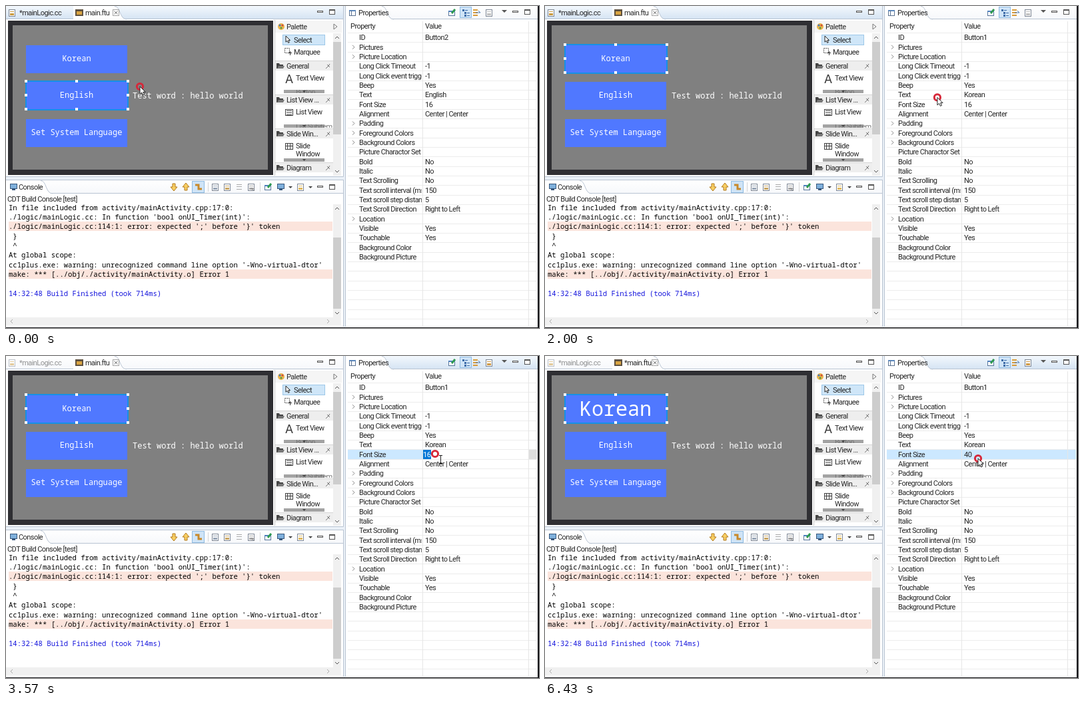
Write an HTML page with a canvas that moves like this. It is 800 px wide and 484 px high and loops after 6570 ms.

```html
<!DOCTYPE html>
<html lang="en">
<head>
<meta charset="utf-8">
<title>Changing a button's font size</title>
<style>
  html, body { margin: 0; width: 100%; height: 100%; overflow: hidden; background: #fff; }
  canvas { display: block; width: 800px; height: 484px; }
</style>
</head>
<body>
<canvas id="stage" width="800" height="484"></canvas>
<script>
const ctx = document.getElementById('stage').getContext('2d');
const LOOP = 6570, STEP = 1000 / 7;
const UI = '11px Roboto, sans-serif';
const mono = size => `${size}px "Noto Sans Mono", monospace`;
const INK = '#262626', EDGE = '#b9c4d2', ROW = 14.33;

// Moments of the interaction, in ms
const PICK = 710, ROW_CLICK = 2290, EDIT = 2430, TYPE_4 = 4140, TYPE_40 = 4430, COMMIT = 5000;

// Pointer path: time, x, y
const PATH = [
  [0, 201, 121], [140, 198, 119], [710, 132, 89], [1140, 132, 89], [1570, 395, 108],
  [2140, 652, 147], [2290, 652, 147], [2430, 644, 147], [COMMIT, 644, 147], [5430, 650, 154], [LOOP, 650, 154]
];

const PROPERTIES = [
  ['ID', ''], ['>Pictures'], ['>Picture Location'], ['Long Click Timeout', '-1'],
  ['Long Click event trigger', '-1'], ['Beep', 'Yes'], ['Text', ''], ['Font Size', ''],
  ['Alignment', 'Center | Center'], ['>Padding'], ['>Foreground Colors'], ['>Background Colors'],
  ['Picture Charactor Set'], ['Bold', 'No'], ['Italic', 'No'], ['Text Scrolling', 'No'],
  ['Text scroll interval (ms)', '150'], ['Text scroll step distance', '5'],
  ['Text Scroll Direction', 'Right to Left'], ['>Location'], ['Visible', 'Yes'],
  ['Touchable', 'Yes'], ['Background Color'], ['Background Picture']
];
const FONT_ROW = 7;

const LOG = [
  'In file included from activity/mainActivity.cpp:17:0:',
  "./logic/mainLogic.cc: In function 'bool onUI_Timer(int)':",
  "./logic/mainLogic.cc:114:1: error: expected ';' before '}' token",
  ' }', ' ^', 'At global scope:',
  "cc1plus.exe: warning: unrecognized command line option '-Wno-virtual-dtor'",
  'make: *** [../obj/./activity/mainActivity.o] Error 1', '',
  '14:32:48 Build Finished (took 714ms)'
];

function box(x, y, w, h, fill, stroke) {
  if (fill) { ctx.fillStyle = fill; ctx.fillRect(x, y, w, h); }
  if (stroke) { ctx.strokeStyle = stroke; ctx.lineWidth = 1; ctx.strokeRect(x + .5, y + .5, w - 1, h - 1); }
}

function line(points, color = '#555', width = 1) {
  ctx.beginPath();
  points.forEach(([x, y]) => ctx.lineTo(x, y));
  ctx.strokeStyle = color;
  ctx.lineWidth = width;
  ctx.stroke();
}

function shape(points, fill) {
  ctx.beginPath();
  points.forEach(([x, y]) => ctx.lineTo(x, y));
  ctx.closePath();
  ctx.fillStyle = fill;
  ctx.fill();
}

function disc(x, y, r, fill) {
  ctx.beginPath();
  ctx.arc(x, y, r, 0, 7);
  ctx.fillStyle = fill;
  ctx.fill();
}

// y is the vertical middle of the text line; baselines sit on whole pixels
function label(text, x, y, color = INK, font = UI, align = 'left') {
  ctx.font = font;
  ctx.letterSpacing = font === UI ? '-0.55px' : '0px';
  ctx.textAlign = align;
  ctx.fillStyle = color;
  ctx.fillText(text, x, Math.round(y + parseFloat(font) * .35));
}

function clipped(x, y, w, h, draw) {
  ctx.save();
  ctx.beginPath();
  ctx.rect(x, y, w, h);
  ctx.clip();
  draw();
  ctx.restore();
}

function chevron(x, y, dx, dy, color = '#555') {
  line([[x - dx - dy * 3, y - dy - dx * 3], [x + dx * 2, y + dy * 2], [x - dx + dy * 3, y - dy + dx * 3]], color);
}

function strip(x, y, w, active) {
  const shade = ctx.createLinearGradient(0, y, 0, y + 19);
  shade.addColorStop(0, active ? '#f3f8fd' : '#fff');
  shade.addColorStop(1, active ? '#d6e4f3' : '#f6f8fb');
  box(x, y, w, 20, shade);
  line([[x, y + 19.5], [x + w, y + 19.5]], EDGE);
}

function tab(x, y, w, h = 20) {
  const curve = () => {
    ctx.lineTo(x + w - 14, y + .5);
    ctx.bezierCurveTo(x + w - 5, y, x + w - 7, y + h, x + w + 4, y + h);
  };
  ctx.beginPath();
  ctx.moveTo(x, y + h);
  ctx.lineTo(x, y);
  curve();
  ctx.fillStyle = '#fff';
  ctx.fill();
  ctx.beginPath();
  curve();
  ctx.strokeStyle = EDGE;
  ctx.lineWidth = 1;
  ctx.stroke();
}

function windowButtons(x, y) {
  box(x - 4, y - 2, 9, 3, '#fff', '#555');
  box(x + 14, y - 4, 9, 8, '#fff', '#555');
  line([[x + 14, y - 2.5], [x + 23, y - 2.5]]);
}

function page(x, y, accent) {
  box(x - 5, y - 5, 10, 11, '#fff', '#7e8795');
  box(x - 3, y - 2, 6, 1, accent);
  box(x - 3, y + 1, 6, 3, accent);
}

function monitor(x, y) {
  box(x - 5, y - 5, 11, 8, '#7fb0dc', '#38577c');
  box(x - 2, y + 3, 5, 2, '#38577c');
}

function pinned(x, y) {
  box(x - 5, y - 3, 10, 8, '#fff', '#56749a');
  box(x - 5, y - 3, 10, 2, '#4f80bd');
  line([[x, y + 1], [x + 5, y - 5]], '#2f9a50', 3);
}

function blockArrow(x, y, dir) {
  const points = [[-2, -5], [2, -5], [2, 0], [5, 0], [0, 6], [-5, 0], [-2, 0]]
    .map(([px, py]) => [x + px, y + py * dir]);
  shape(points, '#f8cf63');
  line([...points, points[0]], '#b3791a');
}

function folder(x, y) {
  shape([[x, y - 4], [x + 4, y - 4], [x + 5, y - 2], [x + 10, y - 2], [x + 10, y + 4], [x, y + 4]], '#444');
  shape([[x + 3, y], [x + 12, y], [x + 10, y + 4], [x + 1, y + 4]], '#777');
}

function cross(x, y, r, color) {
  line([[x - r, y - r], [x + r, y + r]], color);
  line([[x + r, y - r], [x - r, y + r]], color);
}

function scrollbar(x, top, bottom, thumbTop, thumbBottom) {
  box(x, top, 12, bottom - top, '#f0f0f0');
  box(x, thumbTop, 12, thumbBottom - thumbTop, '#cdcdcd');
  chevron(x + 6, top + 7, 0, -1);
  chevron(x + 6, bottom - 7, 0, 1);
}

function drawEditorTabs(active, dirty) {
  strip(0, 0, 507, active);
  ctx.globalAlpha = active ? 1 : .5;
  page(9, 10, '#c99a3f');
  label('*mainLogic.cc', 20, 10);
  ctx.globalAlpha = 1;
  tab(101, 0, 76);
  box(104, 5, 12, 10, '#5e5140');
  box(106, 8, 8, 5, '#d9a441');
  label(dirty ? '*main.ftu' : 'main.ftu', 119, 10);
  box(160, 5, 10, 10, null, '#a5a5a5');
  cross(165, 10, 2.5, '#777');
  windowButtons(471, 9);
}

function drawDesigner(selected, big) {
  box(3, 22, 398, 232, '#2f2f33');
  box(10, 29, 383, 217, '#808080');
  ['Korean', 'English', 'Set System Language'].forEach((name, i) => {
    const y = Math.round(59 + i * 55.4);
    box(30, y, 152, 42, '#5078ff');
    label(name, 106, y + 20, '#fff', mono(big && i === 0 ? 30 : 12), 'center');
  });
  label('Test word : hello world', 190, 135, '#fff', mono(12));
  const top = 58 + selected * 55;
  ctx.strokeStyle = '#1590e6';
  ctx.lineWidth = 2;
  ctx.strokeRect(30, top, 153, 43);
  for (const dx of [0, 76, 153]) for (const dy of [0, 21, 42])
    if (dx !== 76 || dy !== 21) box(28 + dx, top - 2 + dy, 4, 4, '#fff');
}

function drawPalette() {
  box(404, 22, 100, 233, '#fff');
  line([[403.5, 21], [403.5, 255]], '#c8c8c8');
  box(404, 22, 100, 18, '#f5f5f5');
  disc(413, 31, 5, '#e9b44c');
  disc(411, 29, 1.5, '#3f78c8');
  disc(415, 29, 1.5, '#cf4a3a');
  disc(413, 33, 1.5, '#4b9a4b');
  label('Palette', 421, 31);
  line([[492, 27], [497, 31], [492, 35], [492, 27]], '#777');
  box(415, 43, 64, 16, '#cfe6f8', '#9cc7e8');
  arrow(420, 45, .8);
  label('Select', 432, 51);
  ctx.setLineDash([2, 1]);
  box(418, 63, 8, 8, null, '#555');
  ctx.setLineDash([]);
  line([[424, 70.5], [429, 70.5]], '#333');
  line([[426.5, 68], [426.5, 74]], '#333');
  label('Marquee', 432, 69);

  [['General', 90], ['List View ...', 141], ['Slide Win...', 192], ['Diagram', 243]].forEach(([name, y]) => {
    box(404, y - 8, 87, 15, '#eeeeee');
    line([[404, y - 7.5], [491, y - 7.5]], '#d5d5d5');
    folder(406, y);
    label(name, 421, y);
    line([[480, y + 4], [484, y], [482, y - 2], [486, y + 2], [484, y], [486, y - 3]], '#777');
  });

  label('A', 425, 110, '#333', '17px "DejaVu Sans", sans-serif', 'center');
  label('Text View', 435, 108);
  label('List View', 435, 159);
  label('Slide', 435, 210);
  label('Window', 435, 222);
  box(419, 155, 12, 10, '#fff', '#444');
  for (const y of [157, 160, 163]) box(421, y, 8, 1, '#444');
  box(419, 206, 12, 10, '#fff', '#444');
  for (const x of [422, 426]) box(x, 207, 1, 8, '#444');
  box(420, 210, 10, 1, '#444');
  [[126, 'Button'], [178, 'List Subitem'], [229, '']].forEach(([y, hidden]) => {
    box(417, y, 61, 5, '#a3a3a3');
    clipped(417, y, 74, 5, () => label(hidden, 435, y + 3, '#777'));
    shape([[445, y + 1], [450, y + 1], [447.5, y + 4]], '#444');
  });
  scrollbar(491, 41, 255, 54, 193);
}

function drawConsole() {
  box(0, 261, 507, 222, '#fff');
  strip(0, 262, 507, false);
  tab(0, 262, 66);
  line([[0, 261.5], [507, 261.5]], EDGE);
  monitor(11, 272);
  label('Console', 19, 272);
  blockArrow(252, 272, 1);
  blockArrow(270, 272, -1);
  box(279, 263, 19, 18, '#cfe4f7', '#8fbbe2');
  line([[284, 269], [289, 269], [289, 275], [294, 275]], '#c8892b', 3);
  page(314, 272, '#9aa7b8');
  page(332, 272, '#c9a765');
  for (const y of [268, 271, 275]) box(346, y, 8, 1, '#aaa');
  page(368, 272, '#aaa');
  cross(370.5, 275.5, 2.5, '#888');
  line([[303.5, 265], [303.5, 279]], '#d5d5d5');
  line([[381.5, 265], [381.5, 279]], '#d5d5d5');
  pinned(393, 272);
  monitor(412, 272);
  page(442, 272, '#e0ba62');
  for (const x of [427, 457]) shape([[x - 3, 271], [x + 3, 271], [x, 274]], '#444');
  windowButtons(471, 272);
  label('CDT Build Console [test]', 2, 290);

  LOG.forEach((text, i) => {
    const y = 303 + i * ROW;
    if (i === 2 || i === 7) box(4, Math.round(y - 7.5), 486, 14, '#fbe4dc');
    label(text, 4, y, i === 9 ? '#1414dc' : '#000', mono(10.625));
  });
  scrollbar(491, 298, 468, 348, 455);
  box(0, 468, 503, 12, '#f0f0f0');
  chevron(9, 474, -1, 0, '#aaa');
  chevron(483, 474, 1, 0, '#aaa');
}

function drawProperties(state) {
  const { active, editing, hovered, committed, typed, selected } = state;
  box(509, 0, 289, 483, '#fff');
  strip(510, 0, 288, active);
  tab(510, 0, 68);
  box(515, 6, 10, 9, '#fff', '#5c7392');
  box(515, 6, 10, 2, '#5b88bd');
  line([[518.5, 7], [518.5, 15]], '#5c7392');
  label('Properties', 529, 10);
  pinned(669, 10);
  box(681, 1, 18, 17, '#cfe4f7', '#8fbbe2');
  for (const [x, y] of [[685, 5], [688, 9], [688, 13]]) {
    box(x, y, 3, 3, '#3e6ca8');
    box(x + 4, y + 1, 4, 1, '#3e6ca8');
  }
  for (const y of [5, 9, 13]) box(701, y, 7, 2, '#d99b3a');
  line([[705, 10], [712, 10], [709, 7]], '#4b78b0');
  page(725, 10, active ? '#cf9a45' : '#c0c0c0');
  shape([[744, 6], [752, 6], [748, 10]], '#555');
  windowButtons(764, 9);

  label('Property', 517, 30.5);
  label('Value', 629, 30.5);
  const rowTop = Math.round(47.5 + (FONT_ROW - .5) * ROW);
  if (editing) {
    box(513, rowTop, 112, 14, '#cce8ff');
  } else if (hovered || committed) {
    box(513, rowTop, 284, 14, committed ? '#cce8ff' : '#e5f3ff');
  }
  for (let i = 0; i <= 30; i++) {
    const y = Math.round(40 + i * ROW) + .5;
    line([[513, y], [796, y]], '#ececec');
  }
  for (const x of [625.5, 784.5]) line([[x, 23], [x, 481]], '#e6e6e6');

  const values = { 0: selected ? 'Button2' : 'Button1', 6: selected ? 'English' : 'Korean' };
  PROPERTIES.forEach(([entry, fixed = ''], i) => {
    const y = 47.5 + i * ROW, expandable = entry[0] === '>';
    if (expandable) chevron(521, y, 1, 0, '#888');
    clipped(513, y - 8, 111, 16, () => label(expandable ? entry.slice(1) : entry, 530, y));
    if (i !== FONT_ROW) {
      label(values[i] || fixed, 629, y);
    } else if (editing) {
      box(785, rowTop, 12, 14, '#dedede');
      if (typed === '16') box(626, rowTop, 12, 14, '#0078d7');
      label(typed, 626, y, typed === '16' ? '#fff' : INK);
    } else {
      label(committed ? '40' : '16', 629, y);
    }
  });
}

function arrow(x, y, scale = 1) {
  const points = [[0, 0], [0, 11.5], [2.7, 9], [4.6, 13], [6.6, 12], [4.8, 8.2], [8.2, 8.2]]
    .map(([px, py]) => [x + px * scale, y + py * scale]);
  shape(points, '#fff');
  line([...points, points[0]], '#222');
}

function pointerAt(t) {
  const i = PATH.findIndex(([time]) => time > t);
  const [t0, x0, y0] = PATH[i - 1], [t1, x1, y1] = PATH[i];
  const k = (t - t0) / (t1 - t0);
  return [x0 + (x1 - x0) * k, y0 + (y1 - y0) * k];
}

function drawPointer(t, editing) {
  const [x, y] = pointerAt(t);
  if (t === PICK || t === ROW_CLICK) {
    disc(x, y - 1, 7, 'rgba(150,195,245,.6)');
    disc(x, y - 1, 3.5, '#6ca8ee');
  } else {
    ctx.beginPath();
    ctx.arc(x, y, 4.6, 0, 7);
    ctx.strokeStyle = '#d6283a';
    ctx.lineWidth = 3;
    ctx.stroke();
  }
  if (editing) {
    line([[x + 6, y + 2.5], [x + 11, y + 2.5]], '#222');
    line([[x + 8.5, y + 2], [x + 8.5, y + 14]], '#222');
    line([[x + 6, y + 14.5], [x + 11, y + 14.5]], '#222');
  } else {
    arrow(x, y);
  }
}

function draw(now) {
  // The picture advances seven times a second, on times rounded to 10 ms
  const index = Math.floor((now % LOOP + 5) / STEP) % 46;
  const t = Math.round(index * STEP / 10) * 10;
  const committed = t >= COMMIT;
  const active = t >= EDIT;
  const editing = active && !committed;
  const selected = t < PICK ? 1 : 0;
  const typed = t < TYPE_4 ? '16' : t < TYPE_40 ? '4' : '40';

  box(0, 0, 800, 484, '#eaf0f7');
  box(0, 0, 507, 256, '#fff');
  drawEditorTabs(!active, committed);
  drawDesigner(selected, committed);
  drawPalette();
  drawConsole();
  drawProperties({ active, editing, hovered: t >= 2140, committed, typed, selected });
  line([[0, 256.5], [506.5, 256.5], [506.5, 0]], EDGE);
  line([[506.5, 261], [506.5, 482]], EDGE);
  line([[509.5, 0], [509.5, 482]], EDGE);
  box(798, 0, 2, 484, '#17171b');
  box(0, 483, 800, 1, '#17171b');
  drawPointer(t, editing);
  requestAnimationFrame(() => draw(performance.now() - start));
}

const start = performance.now();
draw(0);
</script>
</body>
</html>
```
